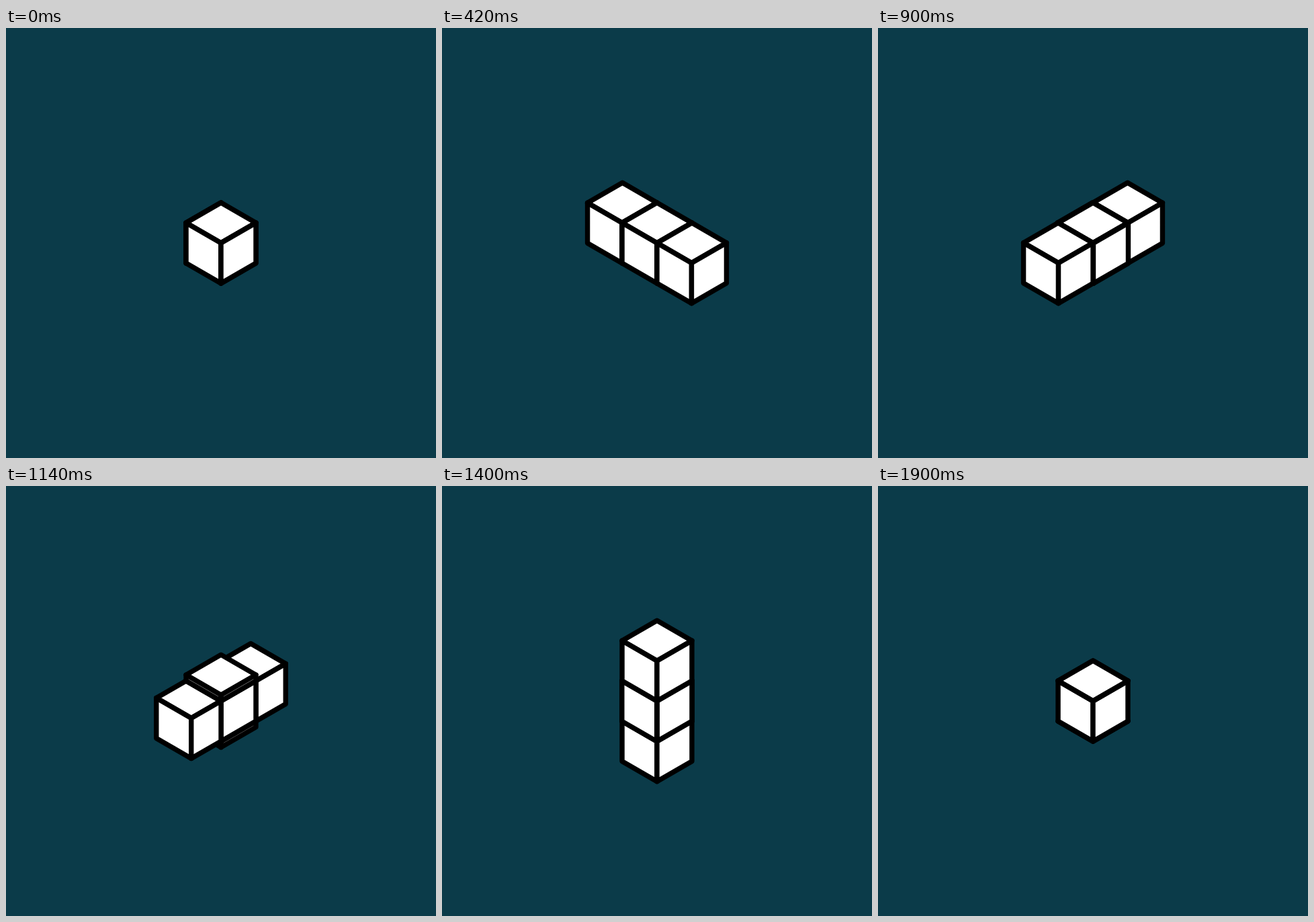
Write an HTML page with a canvas that moves like this. It is 640x640 px and loops after 1940 ms.

```html
<!DOCTYPE html>
<html lang="en">
<head>
<meta charset="utf-8">
<title>Splitting cube</title>
<style>
  html, body { margin: 0; width: 100%; height: 100%; overflow: hidden; background: #0b3b49; }
  canvas { display: block; width: 640px; height: 640px; }
</style>
</head>
<body>
<canvas id="stage" width="640" height="640"></canvas>
<script>
const ctx = document.getElementById('stage').getContext('2d');
const LOOP = 1940, TICK = 20, LAST = 1900, PHASE = 480;
const EDGE = 60, HALF_W = EDGE * Math.sqrt(3) / 2;

// Isometric projection: a points right-down, b left-down, c up.
const project = ([a, b, c]) => [
  320 + HALF_W * (a - b),
  320 + EDGE / 2 * (a + b) - EDGE * c
];

// cubic-bezier(.8, 0, .2, 1), solved by bisection
function ease(x) {
  if (x <= 0) return 0;
  if (x >= 1) return 1;
  let lo = 0, hi = 1;
  for (let i = 0; i < 40; i++) {
    const s = (lo + hi) / 2, r = 1 - s;
    if (2.4 * r * r * s + 0.6 * r * s * s + s * s * s < x) lo = s;
    else hi = s;
  }
  return lo * lo * (3 - 2 * lo);
}

function face(points) {
  ctx.beginPath();
  points.forEach(p => ctx.lineTo(...project(p)));
  ctx.closePath();
  ctx.fill();
  ctx.stroke();
}

// The three visible faces of a box between two corners
function box([a0, b0, c0], [a1, b1, c1]) {
  face([[a0, b0, c1], [a1, b0, c1], [a1, b1, c1], [a0, b1, c1]]);
  face([[a0, b1, c1], [a1, b1, c1], [a1, b1, c0], [a0, b1, c0]]);
  face([[a1, b0, c1], [a1, b1, c1], [a1, b1, c0], [a1, b0, c0]]);
}

// The part of a shifted cube that sticks out of the middle one
function arm(axis, side, length) {
  const low = [-0.5, -0.5, -0.5], high = [0.5, 0.5, 0.5];
  if (side > 0) {
    low[axis] = 0.5;
    high[axis] = 0.5 + length;
  } else {
    high[axis] = -0.5;
    low[axis] = -0.5 - length;
  }
  box(low, high);
}

function draw(time) {
  const phase = Math.min(3, Math.floor(time / PHASE));
  const e = ease(time / PHASE - phase);
  const arms = [];
  if (phase > 0) arms.push([phase - 1, 1 - e]);
  if (phase < 3) arms.push([phase, e]);

  ctx.fillStyle = '#0b3b49';
  ctx.fillRect(0, 0, 640, 640);
  ctx.fillStyle = '#fff';
  ctx.strokeStyle = '#000';
  ctx.lineWidth = 7.4;
  ctx.lineJoin = 'round';

  arms.forEach(([axis, length]) => arm(axis, -1, length));
  box([-0.5, -0.5, -0.5], [0.5, 0.5, 0.5]);
  arms.forEach(([axis, length]) => arm(axis, 1, length));
}

const start = performance.now();
function tick() {
  const t = (performance.now() - start) % LOOP;
  draw(Math.min(LAST, Math.floor(t / TICK) * TICK));
  requestAnimationFrame(tick);
}
tick();
</script>
</body>
</html>
```
